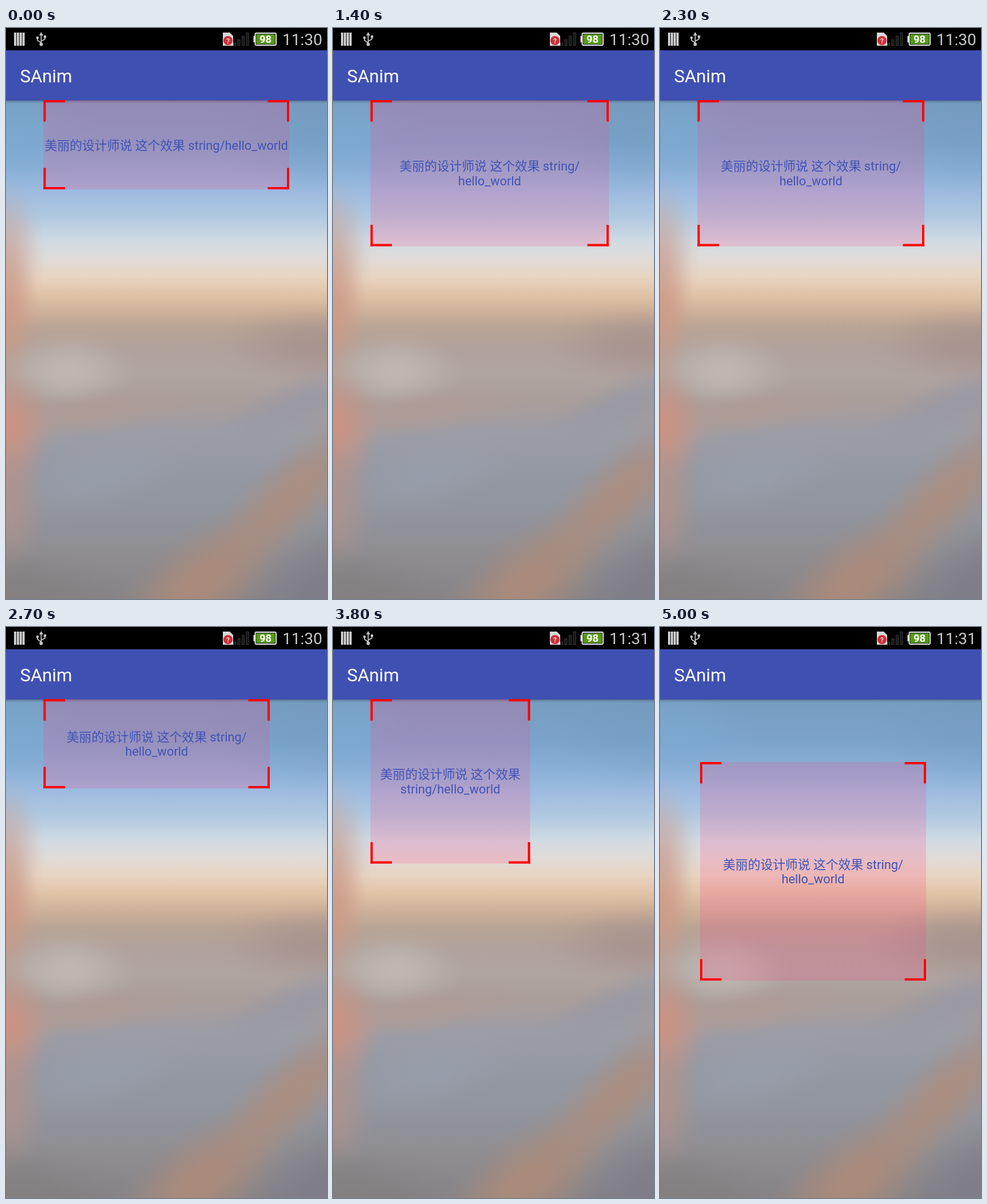
Write an HTML page with a canvas that moves like this. It is 561 px wide and 998 px high and loops after 5100 ms.

```html
<!DOCTYPE html>
<html lang="zh-CN">
<head>
<meta charset="utf-8">
<title>SAnim</title>
<style>
html, body { margin: 0; width: 100%; height: 100%; overflow: hidden; background: #000; }
canvas { display: block; }
</style>
</head>
<body>
<canvas id="stage" width="561" height="998"></canvas>
<script>
const W = 561, H = 998, LOOP = 5100, STEP = 100;
const FONT = 'Roboto, "Noto Sans CJK SC", "Noto Sans CJK", sans-serif';
const stage = document.getElementById('stage').getContext('2d');

// time, left, top, right, bottom of the selection box
const KEYS = [
  [0, 65.5, 126, 495, 282],
  [800, 65.5, 126, 495, 282],
  [900, 65.5, 126, 501, 282],
  [1900, 65.5, 126, 463, 481],
  [2700, 65.5, 126, 461, 282],
  [3300, 65.5, 126, 283, 325],
  [4300, 65.5, 126, 406, 502],
  [4700, 65.5, 126, 460.5, 508],
  [4800, 65.5, 126, 460.5, 508],
  [5000, 70, 236, 465, 618]
];

const TOKENS = [...'美丽的设计师说', ' ', ...'这个效果', ' ', 'string/', 'hello_world'];

function rect(c, color, x, y, w, h) {
  c.fillStyle = color;
  c.fillRect(x, y, w, h);
}

function label(c, text, x, y, font, color, align = 'left') {
  c.font = font + ' ' + FONT;
  c.fillStyle = color;
  c.textAlign = align;
  c.fillText(text, x, y);
}

// soft rotated ellipse that fades out towards its rim
function glow(c, color, x, y, rx, ry, deg = 0, alpha = 1) {
  c.save();
  c.translate(x, y);
  c.rotate(deg * Math.PI / 180);
  c.scale(rx, ry);
  c.globalAlpha = alpha;
  const g = c.createRadialGradient(0, 0, 0, 0, 0, 1);
  [['ff', 0], ['e0', .25], ['80', .55], ['26', .8], ['00', 1]]
    .forEach(([a, p]) => g.addColorStop(p, color + a));
  c.fillStyle = g;
  c.fillRect(-1, -1, 2, 2);
  c.restore();
}

function paintBackdrop(c) {
  const sky = c.createLinearGradient(0, 0, 0, H);
  [[126, '#779cc0'], [200, '#7ba4cb'], [250, '#8bb0d7'], [290, '#9ebce0'],
   [330, '#b0c8e0'], [375, '#d2dbe3'], [405, '#e0dbd6'], [435, '#e8d4c1'],
   [465, '#e1c3a7'], [495, '#ceb199'], [525, '#b9a495'], [560, '#b1a29b'],
   [605, '#b0a5a1'], [655, '#a99d9a'], [710, '#9c9da5'], [770, '#9499a4'],
   [840, '#91959e'], [910, '#8f8e93'], [998, '#878488']
  ].forEach(([y, color]) => sky.addColorStop(y / H, color));
  rect(c, sky, 0, 0, W, H);

  glow(c, '#7399be', 561, 150, 220, 150, 0, .5);
  glow(c, '#7db0d8', 20, 185, 150, 90, 0, .4);
  glow(c, '#c6a096', 0, 400, 70, 140, 0, .75);
  glow(c, '#cd9a86', 0, 500, 60, 130, 0, .85);
  glow(c, '#a58f8b', 545, 555, 190, 75, 0, .75);
  glow(c, '#bfb8b2', 110, 600, 120, 70, 0, .95);
  glow(c, '#b29a90', 130, 675, 230, 45, -8, .65);
  glow(c, '#9598a5', 520, 655, 200, 55, -22, .75);
  glow(c, '#9a9fad', 170, 775, 170, 75, -20, .7);
  glow(c, '#ce9281', 0, 700, 85, 120, 0, .95);
  glow(c, '#b69288', 0, 830, 75, 140, 0, .75);
  glow(c, '#827d7c', 30, 998, 230, 100, 10, .7);
  glow(c, '#ad8b79', 335, 975, 200, 95, -38, .95);
  glow(c, '#ad8d7e', 500, 815, 230, 75, -43, .9);
  glow(c, '#7c7b88', 555, 985, 170, 110, -40, .85);
}

function paintStatusIcons(c) {
  for (let i = 0; i < 4; i++) rect(c, '#cfcfcf', 14 + i * 4.9, 8, 3.9, 23);

  // usb connection
  c.strokeStyle = c.fillStyle = '#c4c4c4';
  c.lineWidth = 1.8;
  c.beginPath();
  c.moveTo(61.5, 12); c.lineTo(61.5, 28);
  c.moveTo(61.5, 26); c.lineTo(55, 21.5); c.lineTo(55, 17);
  c.moveTo(61.5, 23); c.lineTo(68, 19.5); c.lineTo(68, 15);
  c.stroke();
  c.beginPath();
  c.moveTo(61.5, 7); c.lineTo(65, 13); c.lineTo(58, 13);
  c.fill();
  c.beginPath();
  c.arc(61.5, 28.5, 3, 0, 7);
  c.arc(55, 17, 2.3, 0, 7);
  c.fill();
  c.fillRect(66, 13, 4.2, 4.2);

  // card with a question badge
  c.fillStyle = '#d8d8d8';
  c.beginPath();
  c.moveTo(379, 8); c.lineTo(391, 8); c.lineTo(397, 14);
  c.lineTo(397, 31); c.lineTo(379, 31);
  c.fill();
  c.fillStyle = '#cc3038';
  c.beginPath();
  c.arc(388, 22, 8, 0, 7);
  c.fill();
  label(c, '?', 388, 26.5, 'bold 12px', '#f2cfd0', 'center');

  c.lineWidth = 1;
  c.strokeStyle = '#3c3c3c';
  [5, 11, 17, 23].forEach((h, i) => {
    rect(c, '#151515', 397.5 + i * 7.5, 31 - h, 4, h);
    c.strokeRect(397.5 + i * 7.5, 31.5 - h, 4, h - 1);
  });

  // battery
  rect(c, '#e4e4e4', 432.5, 14, 4, 11);
  c.fillStyle = '#e4e4e4';
  c.beginPath();
  c.roundRect(434.5, 8, 38.5, 23, 3);
  c.fill();
  rect(c, '#1c2b08', 436.5, 10, 34.5, 19);
  rect(c, '#579a12', 437.5, 11, 32.5, 17);
  label(c, '98', 453.5, 26, 'bold 18.5px', '#fff', 'center');
}

function paintChrome(c) {
  const shade = c.createLinearGradient(0, 126, 0, 132);
  shade.addColorStop(0, 'rgba(30,40,60,.5)');
  shade.addColorStop(.35, 'rgba(30,40,60,.2)');
  shade.addColorStop(1, 'rgba(30,40,60,0)');
  rect(c, shade, 0, 126, W, 6);
  rect(c, '#000', 0, 0, W, 39);
  rect(c, '#3f50b3', 0, 39, W, 87.5);
  label(c, 'SAnim', 24.5, 95, '31.2px', '#fff');
  paintStatusIcons(c);
}

const scene = document.createElement('canvas');
scene.width = W;
scene.height = H;
const sceneCtx = scene.getContext('2d');
paintBackdrop(sceneCtx);
paintChrome(sceneCtx);

function boxAt(t) {
  let i = 1;
  while (i < KEYS.length - 1 && KEYS[i][0] < t) i++;
  const a = KEYS[i - 1], b = KEYS[i];
  const p = Math.min(1, (t - a[0]) / (b[0] - a[0]));
  return [1, 2, 3, 4].map(k => a[k] + (b[k] - a[k]) * p);
}

function wrap(c, room) {
  const lines = [];
  let line = '';
  for (const token of TOKENS) {
    if (line && c.measureText((line + token).trim()).width > room) {
      lines.push(line.trim());
      line = '';
    }
    line += token;
  }
  return [...lines, line.trim()];
}

function paintBox(c, [l, t, r, b]) {
  rect(c, 'rgba(255,64,129,.2)', l, t, r - l, b - t);
  const arm = 37.5, thick = 4;
  for (const x of [l, r]) for (const y of [t, b]) {
    const sx = x === l ? 1 : -1, sy = y === t ? 1 : -1;
    rect(c, '#fe0000', x, y, arm * sx, thick * sy);
    rect(c, '#fe0000', x, y, thick * sx, arm * sy);
  }
  c.font = '21.8px ' + FONT;
  const lines = wrap(c, r - l + 2), gap = 25.6;
  const first = (t + b) / 2 + 8.5 - (lines.length - 1) * gap / 2;
  lines.forEach((text, i) =>
    label(c, text, (l + r) / 2, first + i * gap, '21.8px', '#4053b6', 'center'));
}

function draw(now) {
  const t = Math.floor((now % LOOP) / STEP) * STEP;
  stage.drawImage(scene, 0, 0);
  paintBox(stage, boxAt(t));
  label(stage, t < 3000 ? '11:30' : '11:31', 483, 30, '28px', '#c9c9c9');
}

let start;
function tick(now) {
  start ??= now;
  draw(now - start);
  requestAnimationFrame(tick);
}
draw(0);
requestAnimationFrame(tick);
</script>
</body>
</html>
```
